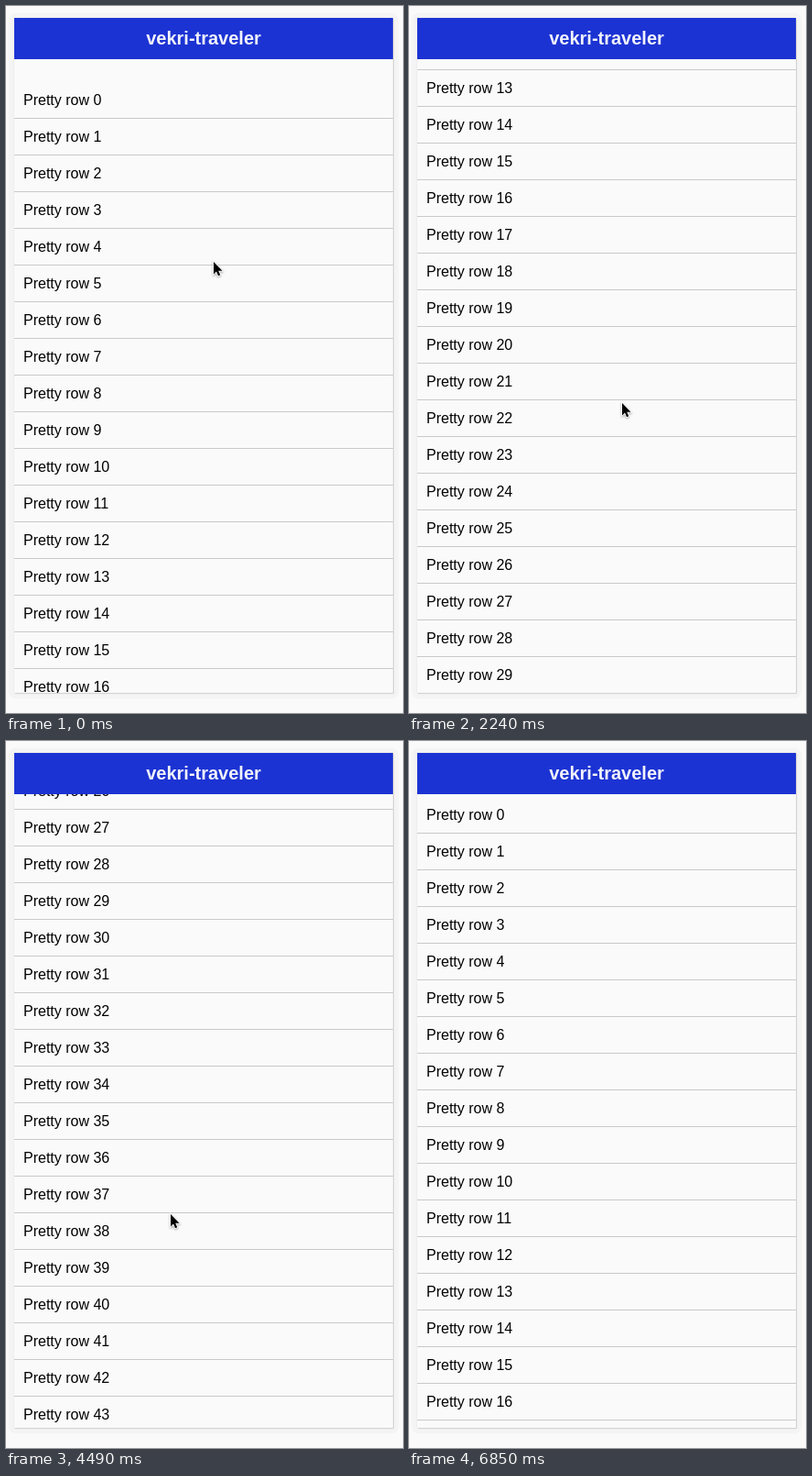
An HTML page for the animation above (6.93 s loop, 434 by 771 pixels).

```html
<!DOCTYPE html>
<html lang="en">
<head>
<meta charset="utf-8">
<title>Scrolling list</title>
<style>
  html, body { margin: 0; width: 100%; height: 100%; overflow: hidden; background: #fafafa; }
  body { position: relative; font: 16px/39px "Liberation Sans", Arial, sans-serif; color: #000; }
  .frame { position: absolute; left: 3px; top: 8px; width: 426px; height: 747px; border-radius: 8px; background: #f4f4f4; box-shadow: 0 0 2px #f4f4f4; }
  .card { position: absolute; left: 9px; top: 13px; width: 414px; height: 736px; background: #fafafa; box-shadow: 1px 1px 1px rgba(0, 0, 0, .11), 0 0 2px rgba(0, 0, 0, .09); }
  .view { position: absolute; inset: 0; overflow: hidden; }
  .list { position: absolute; left: 0; right: 0; top: 45px; }
  .row { height: 39px; padding-left: 10px; border-bottom: 1px solid #c9c9c9; white-space: pre; }
  header { position: absolute; left: 0; top: 0; width: 100%; height: 45px; background: #1c33d3; color: #f2f3fb; font-weight: bold; font-size: 20px; line-height: 45px; text-align: center; }
  .cursor { position: absolute; left: 0; top: 0; overflow: visible; filter: drop-shadow(0 1px 1px rgba(0, 0, 0, .35)); }
</style>
</head>
<body>
<div class="frame"></div>
<div class="card">
  <div class="view">
    <div class="list"></div>
    <header>vekri-traveler</header>
  </div>
</div>
<svg class="cursor" width="12" height="18">
  <path d="M0 0V13.4L3 10.6L5 15.2L7.2 14.2L5.2 9.7H9.5Z" stroke="#fff" stroke-width="1.6" paint-order="stroke"/>
</svg>
<script>
  const LOOP = 6930, STEPS = 58, STEP = 6850 / STEPS;

  // Turning points of the list: [step, offset]
  const SCROLL = [
    [0, 25], [2, 3], [6, 118], [7, 126], [12, 5], [19, -508], [27, -887],
    [33, -1200], [38, -1063], [48, 14], [50, 119], [52, 165], [58, 3]
  ];

  // Turning points of the pointer tip: [step, x, y]
  const POINTER = [
    [0, 227, 279], [6, 236, 534], [19, 233, 433], [27, 197, 390],
    [38, 180, 516], [50, 266, 554], [53, 272, 790]
  ];

  const list = document.querySelector('.list');
  const cursor = document.querySelector('.cursor');

  for (let i = 0; i < 60; i++) {
    const row = document.createElement('div');
    row.className = 'row';
    row.textContent = 'Pretty row ' + i;
    list.append(row);
  }

  const slope = (a, b, c) => (b[c] - a[c]) / (b[0] - a[0]);

  // Tangent that never overshoots its neighbours.
  function tangent(keys, i, c) {
    if (i === 0 || i === keys.length - 1) return 0;
    const m = slope(keys[i - 1], keys[i], c), n = slope(keys[i], keys[i + 1], c);
    return m * n > 0 ? 2 * m * n / (m + n) : 0;
  }

  // Smooth curve through the turning points, still after the last one.
  function sample(keys, step, c) {
    const s = Math.min(step, keys.at(-1)[0]);
    const i = Math.min(keys.findLastIndex(k => k[0] <= s), keys.length - 2);
    const a = keys[i], b = keys[i + 1], h = b[0] - a[0];
    const u = (s - a[0]) / h, v = 1 - u;
    return Math.round(v * v * (1 + 2 * u) * a[c] + u * u * (3 - 2 * u) * b[c]
      + h * u * v * (v * tangent(keys, i, c) - u * tangent(keys, i + 1, c)));
  }

  const move = (el, x, y) => { el.style.transform = `translate(${x}px, ${y}px)`; };

  // The picture holds between steps; the small lead absorbs rounding.
  function draw(time) {
    const step = Math.min(STEPS, Math.floor((time % LOOP + 5) / STEP));
    move(list, 0, sample(SCROLL, step, 1));
    move(cursor, sample(POINTER, step, 1), sample(POINTER, step, 2));
  }

  const start = performance.now();
  function tick() {
    draw(performance.now() - start);
    requestAnimationFrame(tick);
  }
  tick();
</script>
</body>
</html>
```
